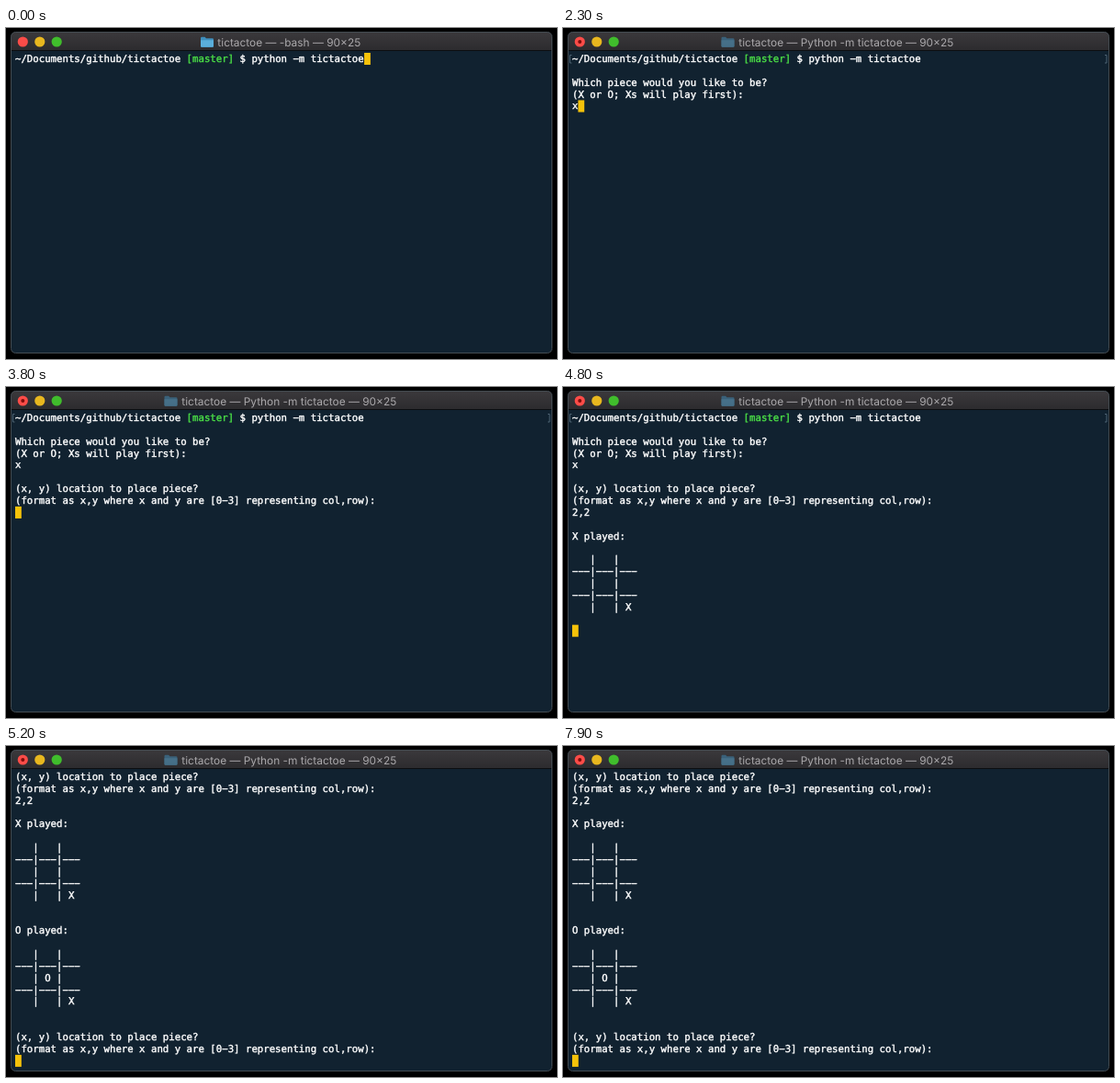
Animation, 600 px wide and 360 px high, one loop 8 s. Source, as an HTML page:

```html
<!DOCTYPE html>
<html lang="en">
<head>
<meta charset="utf-8">
<title>Tic-tac-toe in a terminal</title>
<style>
  html, body { margin: 0; width: 100%; height: 100%; overflow: hidden; background: #000; }
  svg { display: block; width: 600px; height: 360px; }
  text { white-space: pre; text-rendering: geometricPrecision; }
  #screen { font: 10.7px "DejaVu Sans Mono", monospace; fill: #fff; stroke: #fff; stroke-width: .4; }
  #screen .branch { fill: #4ade46; stroke: #4ade46; }
  #title { font: 11.9px Inter, sans-serif; fill: #aaa8ab; text-anchor: middle; }
</style>
</head>
<body>
<svg viewBox="0 0 600 360">
  <defs>
    <linearGradient id="bar" x2="0" y2="1">
      <stop stop-color="#3b393c"/>
      <stop offset="1" stop-color="#2c2b2e"/>
    </linearGradient>
  </defs>
  <rect x="5.5" y="4.5" width="589" height="349" rx="5" fill="#112230"/>
  <path d="M5.5 24.5V9.5a5 5 0 0 1 5-5H589.5a5 5 0 0 1 5 5V24.5Z" fill="url(#bar)"/>
  <path d="M6 24.5H594" stroke="#0c0e11"/>
  <rect x="5.5" y="4.5" width="589" height="349" rx="5" fill="none" stroke="#444c52"/>
  <circle cx="18.3" cy="15" r="5.6" fill="#fb4c48"/>
  <circle id="busy" cx="18.3" cy="15" r="2" fill="#7d0d0b"/>
  <circle cx="36.8" cy="15" r="5.6" fill="#e8b71f"/>
  <circle cx="55.2" cy="15" r="5.6" fill="#40bd2c"/>
  <g id="folder">
    <path d="M0 1.2Q0 0 1.2 0H4.6L6 1.5H12.8Q14 1.5 14 2.7V9.8Q14 11 12.8 11H1.2Q0 11 0 9.8Z" fill="#3f8fbd"/>
    <path d="M0 3.4H14V9.8Q14 11 12.8 11H1.2Q0 11 0 9.8Z" fill="#5aaedb"/>
  </g>
  <text id="title" x="308.3" y="19.6"></text>
  <path id="marks" d="M9.5 29.5H7.5V38H9.5M590 29.5H592V38H590" fill="none" stroke="#4d6272"/>
  <rect id="cursor" width="6.8" height="13" fill="#f5c20a"/>
  <g id="screen"></g>
</svg>
<script>
const LOOP = 8000, LEFT = 10, COL = 6.442, ROW = 12.87, TOP = 27, ROWS = 25;
const $ = id => document.getElementById(id);

const command = "~/Documents/github/tictactoe [master] $ python -m tictactoe";
const askMove = "\n(x, y) location to place piece?\n(format as x,y where x and y are [0-3] representing col,row):\n";
const rule = "---|---|---";
const board = (player, middle, last) =>
  ["", player + " played:", "", "   |   |", rule, middle, rule, last, "", ""].join("\n");

// Text added to the terminal at each time
const output = [
  [0, command],
  [200, "\n"],
  [400, "\nWhich piece would you like to be?\n(X or O; Xs will play first):\n"],
  [2300, "x"],
  [2700, "\n"],
  [2800, askMove],
  [4100, "2"],
  [4200, ","],
  [4400, "2"],
  [4600, "\n" + board("X", "   |   |", "   |   | X")],
  [4900, board("O", "   | O |", "   |   | X") + askMove]
];

function setTitle(running) {
  $("title").textContent = `tictactoe — ${running ? "Python -m tictactoe" : "-bash"} — 90×25`;
  $("folder").setAttribute("transform", `translate(${running ? 172.5 : 212} 9.8)`);
  $("busy").style.display = running ? "" : "none";
}

// The terminal face has wide, high hyphens, so they are set as minus signs
const markup = line => line
  .replaceAll("-", "\u2212")
  .replace("[master]", '<tspan class="branch">$&</tspan>');

function setScreen(text) {
  const all = text.split("\n");
  const lines = all.slice(-ROWS);
  $("screen").innerHTML = lines.map((line, i) =>
    `<text x="${LEFT}" y="${TOP + 9.9 + i * ROW}">${markup(line)}</text>`).join("");
  $("cursor").setAttribute("x", LEFT + lines.at(-1).length * COL);
  $("cursor").setAttribute("y", TOP + (lines.length - 1) * ROW);
  $("marks").style.display = all.length > 1 && all.length <= ROWS ? "" : "none";
}

let shown;
function draw() {
  const t = performance.now() % LOOP;
  const text = output.filter(([at]) => at <= t).map(([, part]) => part).join("");
  if (text !== shown) {
    setScreen(shown = text);
    setTitle(t >= 400);
  }
  const dim = Math.min(1, Math.max(0, (t - 400) / 400));
  $("folder").setAttribute("opacity", 1 - 0.5 * dim);
  requestAnimationFrame(draw);
}
draw();
</script>
</body>
</html>
```
